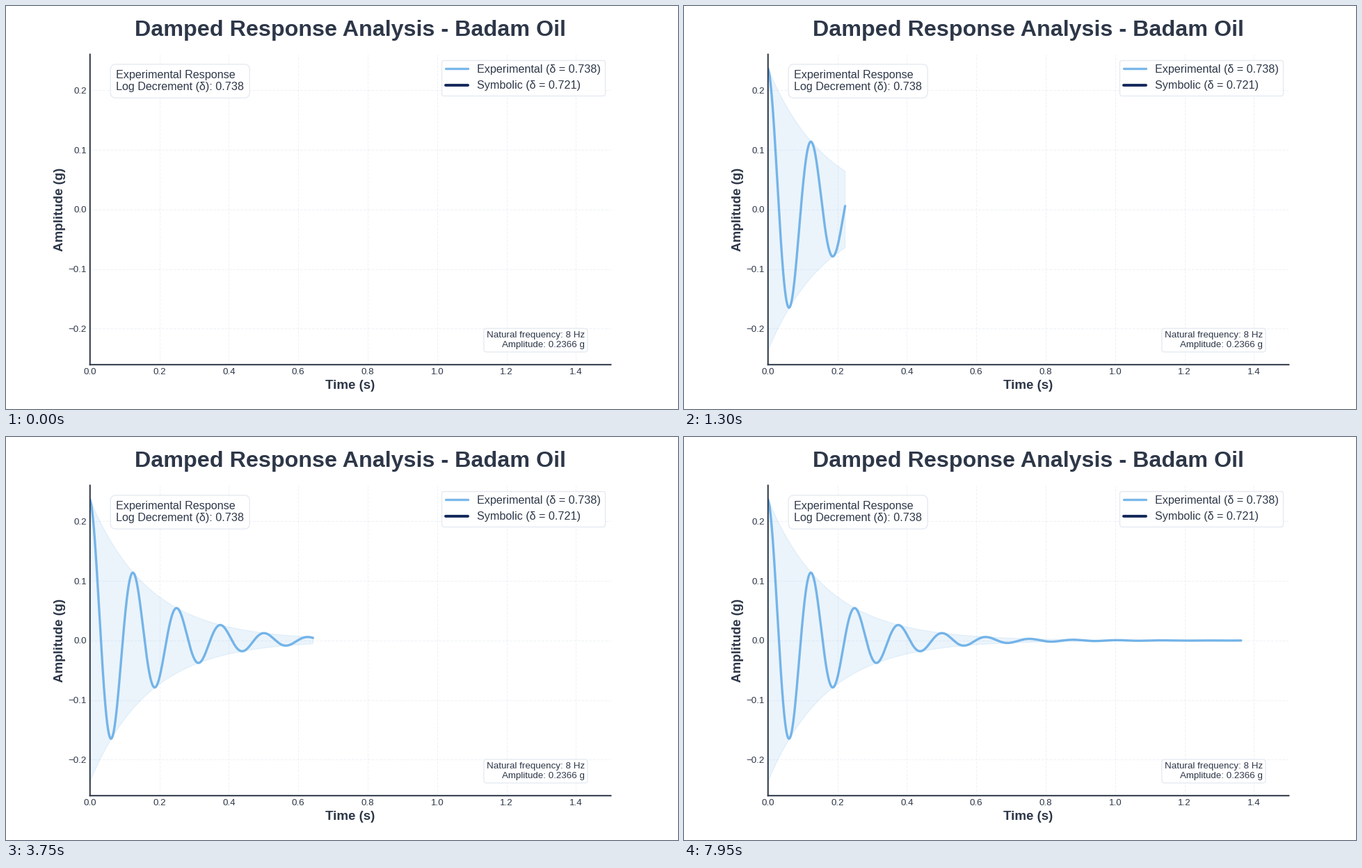
A matplotlib script that plays this animation: 966x580 px, repeating every 8000 ms.

```python
import numpy as np
import matplotlib.pyplot as plt
from matplotlib.animation import FuncAnimation
from matplotlib.ticker import MultipleLocator

W, H = 966, 580
DPI = 72            # one point is one pixel
PT = 96.6 / 72      # pixels per design point

INK = "#2d3748"
EDGE = "#e2e8f0"
BLUE = "#4299e1"
NAVY = "#172b5c"

AMP, FREQ, DELTA = 0.2366, 8.0, 0.738
T_MAX, SAMPLES = 1.5, 2000
SWEEP, FRAMES, STEP_MS = 175, 160, 50

plt.rcParams.update({
    "font.family": "Liberation Sans",
    "text.color": INK,
    "axes.labelcolor": INK,
    "axes.edgecolor": INK,
    "axes.axisbelow": True,
    "lines.solid_capstyle": "round",
})

# Damped oscillator
omega = 2 * np.pi * FREQ
zeta = DELTA / np.hypot(2 * np.pi, DELTA)
omega_d = omega * np.sqrt(1 - zeta ** 2)
time = np.linspace(0, T_MAX, SAMPLES)
env = AMP * np.exp(-zeta * omega * time)
response = env * np.cos(omega_d * time)


def note(x, y, text, size, pad, **align):
    box = dict(boxstyle=f"round,pad={pad}", facecolor="white",
               edgecolor=EDGE, linewidth=PT, alpha=0.9)
    ax.text(x, y, text, fontsize=size * PT, transform=ax.transAxes,
            bbox=box, **align)


fig = plt.figure(figsize=(W / DPI, H / DPI), dpi=DPI, facecolor="white")
ax = fig.add_axes([0.125, 0.11, 0.775, 0.77])
ax.set_xlim(0, T_MAX)
ax.set_ylim(-1.1 * AMP, 1.1 * AMP)
ax.xaxis.set_major_locator(MultipleLocator(0.2))
ax.yaxis.set_major_locator(MultipleLocator(0.1))
ax.tick_params(length=0, pad=3.5 * PT, labelsize=10 * PT, labelcolor=INK)
ax.grid(True, linestyle="--", color=EDGE, alpha=0.5, linewidth=0.8 * PT)

for side in ("top", "right"):
    ax.spines[side].set_visible(False)
for side in ("left", "bottom"):
    ax.spines[side].set(linewidth=1.5 * PT, snap=False)

ax.set_title("Damped Response Analysis - Badam Oil", fontsize=24 * PT,
             fontweight="bold", pad=20 * PT)
label = dict(fontsize=14 * PT, fontweight="bold")
ax.set_xlabel("Time (s)", labelpad=4 * PT, **label)
ax.set_ylabel("Amplitude (g)", labelpad=3 * PT, **label)

shade, = ax.fill([0, 0], [0, 0], color=BLUE, alpha=0.1, linewidth=PT)
curve, = ax.plot([], [], color=BLUE, alpha=0.7, linewidth=2.5 * PT,
                 label="Experimental (δ = 0.738)")
ax.plot([], [], color=NAVY, linewidth=3 * PT, label="Symbolic (δ = 0.721)")

legend = ax.legend(loc="upper right", fontsize=12 * PT, framealpha=0.9,
                   facecolor="white", edgecolor=EDGE)
legend.get_frame().set_linewidth(PT)

note(0.05, 0.95, "Experimental Response\nLog Decrement (δ): 0.738",
     12, 0.5, ha="left", va="top")
note(0.95, 0.05, "Natural frequency: 8 Hz\nAmplitude: 0.2366 g",
     10, 0.3, ha="right", va="bottom")


def update(frame):
    n = max(SAMPLES * frame // SWEEP, 1)
    t, e = time[:n], env[:n]
    curve.set_data(t, response[:n])
    shade.set_xy(np.column_stack([np.r_[t, t[::-1]], np.r_[e, -e[::-1]]]))
    for artist in (curve, shade):
        artist.set_visible(frame > 0)
    return curve, shade


anim = FuncAnimation(fig, update, frames=FRAMES, interval=STEP_MS,
                     init_func=lambda: update(0), repeat=True, repeat_delay=0)
plt.show()
```
